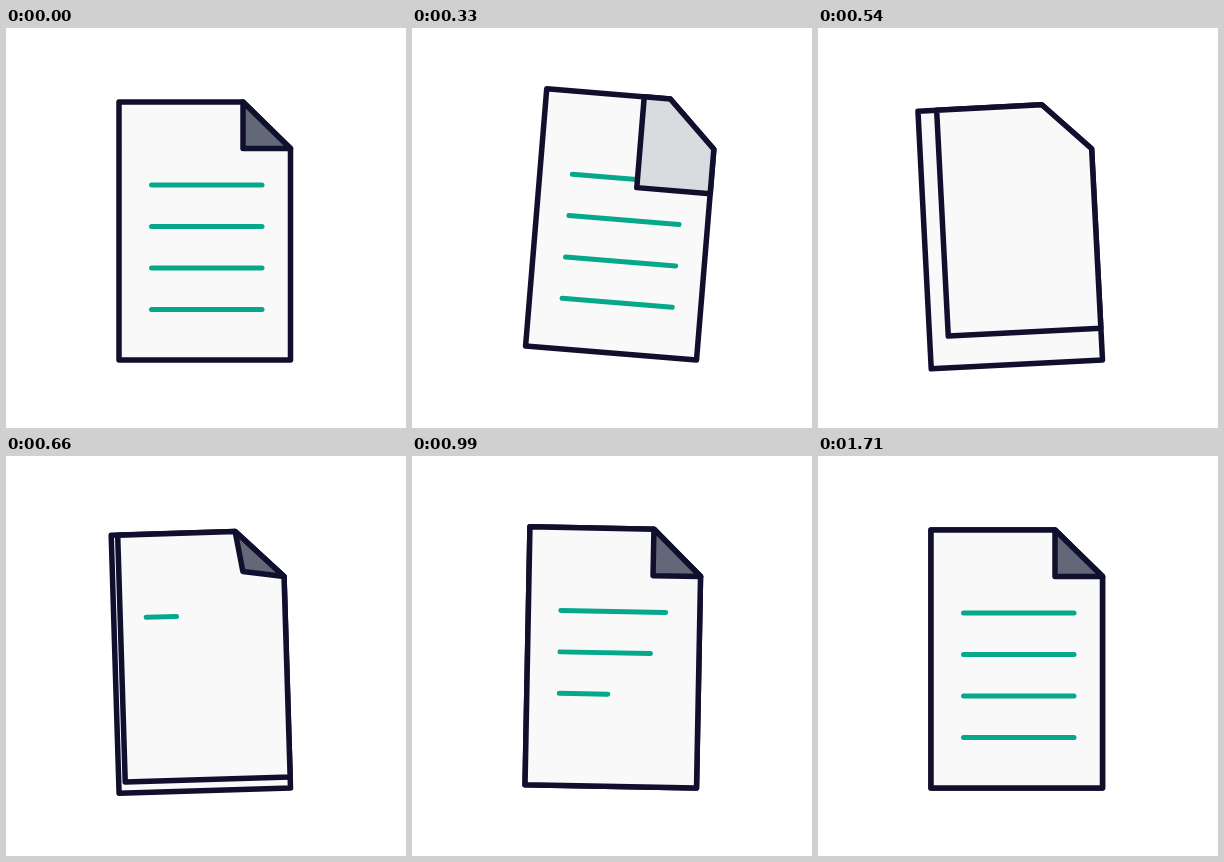
Recreate the animation shown at these times as an HTML page with a canvas. Size 400 by 400 pixels, loop 4.4 s.

```html
<!DOCTYPE html>
<html lang="en">
<head>
<meta charset="utf-8">
<title>Turning page</title>
<style>
  html, body { margin: 0; width: 100%; height: 100%; overflow: hidden; background: #fff; }
  canvas { display: block; }
</style>
</head>
<body>
<canvas width="400" height="400"></canvas>
<script>
const ctx = document.querySelector('canvas').getContext('2d');
const LOOP = 4400, STEP = 30;
const INK = '#110f2e', PAPER = '#f9f9f9', GREEN = '#05a88a', FOLD = [99, 104, 120];
const LEFT = 113, TOP = 74, RIGHT = 284.5, BOTTOM = 332;
const FOLD_X = 237, FOLD_Y = 120.5;
const LINE_X = 145.5, LINE_LENGTH = 110.5;

// [time, degrees]: the sheet swings around its bottom right corner
const SWING = [[0, 0], [225, 7], [555, -3], [870, 2], [1125, 0]];

const clamp = v => Math.min(1, Math.max(0, v));
const progress = (t, start, duration) => clamp((t - start) / duration);
const mix = (a, b, p) => a + (b - a) * p;
const sineInOut = u => (1 - Math.cos(Math.PI * u)) / 2;

// cubic-bezier(.25, 0, 0, 1), solved by bisection
function glide(u) {
  let low = 0, high = 1;
  for (let i = 0; i < 24; i++) {
    const s = (low + high) / 2;
    if (0.75 * s * (1 - s) ** 2 + s ** 3 < u) low = s; else high = s;
  }
  return u >= 1 ? 1 : low * low * (3 - 2 * low);
}

function swingAngle(t) {
  for (let i = 1; i < SWING.length; i++) {
    const [t0, a0] = SWING[i - 1], [t1, a1] = SWING[i];
    if (t < t1) return mix(a0, a1, sineInOut((t - t0) / (t1 - t0)));
  }
  return 0;
}

function polygon(points, fill) {
  ctx.beginPath();
  points.forEach(([x, y]) => ctx.lineTo(x, y));
  ctx.closePath();
  ctx.fillStyle = fill;
  ctx.fill();
  ctx.strokeStyle = INK;
  ctx.lineWidth = 5.5;
  ctx.stroke();
}

// Sheet with a cut corner, reaching to (x, y) at the bottom left
const sheet = (x, y, fill) =>
  polygon([[x, TOP], [FOLD_X, TOP], [RIGHT, FOLD_Y], [RIGHT, y], [x, y]], fill);

function textLine(index, p) {
  if (p <= 0) return;
  const y = 157 + index * 41.5;
  ctx.beginPath();
  ctx.moveTo(LINE_X, y);
  ctx.lineTo(LINE_X + LINE_LENGTH * p, y);
  ctx.strokeStyle = GREEN;
  ctx.lineWidth = 5;
  ctx.stroke();
}

function draw(t) {
  ctx.fillStyle = '#fff';
  ctx.fillRect(0, 0, 400, 400);
  ctx.save();
  ctx.translate(RIGHT, BOTTOM);
  ctx.rotate(swingAngle(t) * Math.PI / 180);
  ctx.translate(-RIGHT, -BOTTOM);
  ctx.lineCap = ctx.lineJoin = 'round';

  sheet(LEFT, BOTTOM, PAPER);
  if (t < 555) for (let i = 0; i < 4; i++) textLine(i, 1);

  // The fold spreads into a fresh sheet
  const spread = glide(progress(t, 243, 640));
  const fade = progress(t, 243, 110);
  const tint = FOLD.map(c => Math.round(mix(c, 249, fade)));
  sheet(mix(FOLD_X, LEFT, spread), mix(FOLD_Y, BOTTOM, spread), `rgb(${tint})`);

  for (let i = 0; i < 4; i++) textLine(i, glide(progress(t, 560 + i * 150, 658)));

  // The fresh sheet gets its own fold
  const refold = 1 - (1 - progress(t, 555, 300)) ** 3;
  if (refold > 0) {
    const corner = [
      mix((FOLD_X + RIGHT) / 2, FOLD_X, refold),
      mix((TOP + FOLD_Y) / 2, FOLD_Y, refold)
    ];
    polygon([[FOLD_X, TOP], [RIGHT, FOLD_Y], corner], `rgb(${FOLD})`);
  }
  ctx.restore();
}

const start = performance.now();
function tick() {
  const t = (performance.now() - start) % LOOP;
  draw(Math.floor(t / STEP) * STEP);
  requestAnimationFrame(tick);
}
tick();
</script>
</body>
</html>
```
